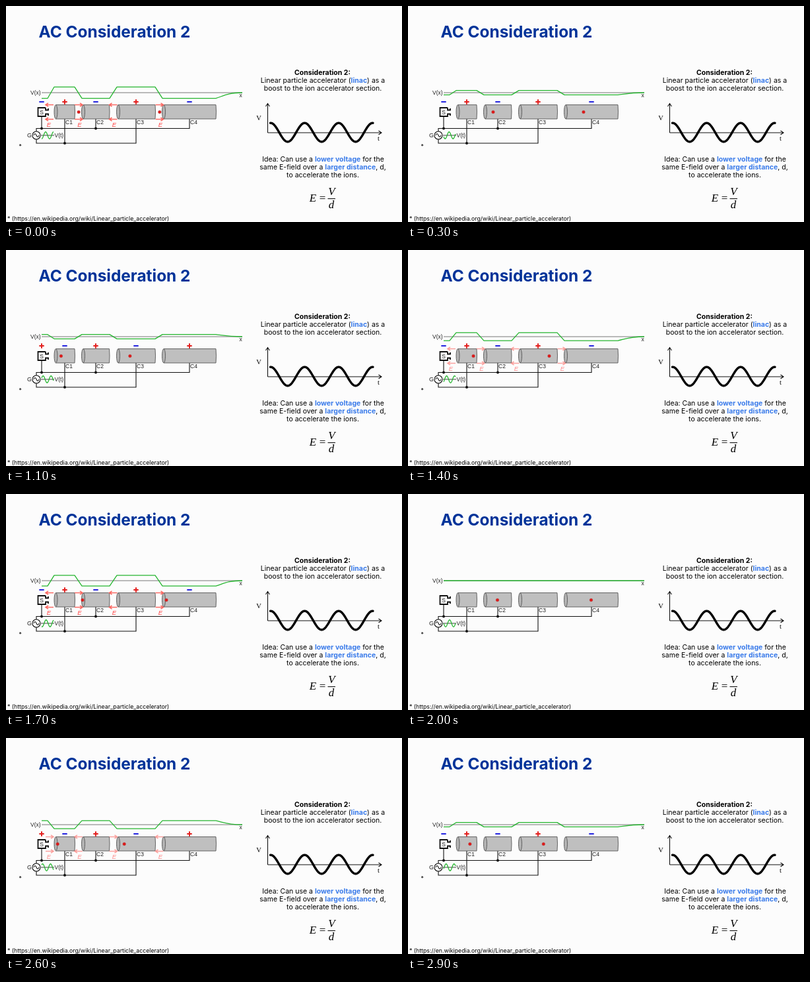
Animation, 600 px wide and 329 px high, one loop 3 s. Source, as an HTML page:

```html
<!DOCTYPE html>
<html lang="en">
<head>
<meta charset="utf-8">
<title>AC Consideration 2</title>
<style>
  html, body { margin: 0; width: 100%; height: 100%; overflow: hidden; background: #fcfcfc; }
  svg { display: block; width: 600px; height: 329px; }
  text { font-family: Inter, sans-serif; }
  .title { font-size: 24.4px; font-weight: 700; fill: #039; }
  .body { font-size: 10.5px; text-anchor: middle; }
  .body .b { font-weight: 700; }
  .key { font-weight: 700; fill: #3a7bea; }
  .note { font-size: 8.75px; }
  .label text { font: 8.5px "Liberation Sans", Arial, sans-serif; fill: #222; }
  .math text { font: 10.5px "Liberation Serif", serif; text-anchor: middle; }
  .math .eq { font-size: 17px; font-style: italic; }
  .line { fill: none; stroke: #111; stroke-width: 1.1; }
  .green { fill: none; stroke: #25b52f; stroke-width: 1.3; stroke-linejoin: round; }
  #field text { font: italic 9.5px "Liberation Sans", Arial, sans-serif; fill: #f44; text-anchor: middle; }
  #field path { fill: none; stroke: #fa6a64; stroke-width: 1.6; }
</style>
</head>
<body>
<svg viewBox="0 0 600 329">
  <text class="title" x="49.5" y="48">AC Consideration 2</text>

  <g class="body">
    <text class="b" x="479.5" y="104.5">Consideration 2:</text>
    <text x="480" y="117">Linear particle accelerator (<tspan class="key">linac</tspan>) as a</text>
    <text x="480" y="129">boost to the ion accelerator section.</text>
    <text x="480.5" y="237">Idea: Can use a <tspan class="key">lower voltage</tspan> for the</text>
    <text x="480" y="249">same E-field over a <tspan class="key">larger distance</tspan>, d,</text>
    <text x="480" y="261">to accelerate the ions.</text>
  </g>
  <text class="note" x="2" y="327">* (https://en.wikipedia.org/wiki/Linear_particle_accelerator)</text>
  <text class="note" x="19.5" y="217">*</text>

  <g class="math">
    <path class="line" d="M396.5 193V149M393.5 153L396.5 148.5L399.5 153M396.5 193H568.5M564.5 190L569 193L564.5 196"/>
    <path id="wave" fill="none" stroke="#000" stroke-width="3.4" stroke-linecap="round"/>
    <text x="383" y="174">V</text>
    <text x="564.5" y="205">t</text>
    <text class="eq" x="465" y="298">E</text>
    <text class="eq" x="479.5" y="298" style="font-style:normal">=</text>
    <text class="eq" x="493.5" y="287.5">V</text>
    <text class="eq" x="493" y="308">d</text>
    <path class="line" d="M487.5 293.5H499"/>
  </g>

  <path d="M54 132H358" stroke="#777"/>
  <path id="volt" class="green"/>

  <g class="line">
    <path d="M54 168V186.5M46 191V186.5H278V172M136 172V186.5M46 203V209H197V172M89 172V209"/>
    <path d="M60 155H48.5V168H60V164.5H64V167M60 155V158.5H64V156" stroke-width="1.8"/>
    <circle cx="46" cy="197" r="6" fill="#fff"/>
    <path d="M42 197Q44 192 46 197T50 197"/>
    <path d="M53 197H73" stroke-width=".8"/>
    <g fill="#111" stroke="none">
      <circle cx="54" cy="186.5" r="2"/>
      <circle cx="136" cy="186.5" r="2"/>
      <circle cx="89" cy="209" r="2"/>
    </g>
  </g>
  <path id="gen" class="green"/>
  <g id="tubes" stroke="#555" stroke-width=".9"></g>

  <g class="label">
    <text x="37" y="135">V(x)</text>
    <text x="353.5" y="138.5">x</text>
    <text x="51.2" y="164.5">S</text>
    <text x="32" y="200" style="font-size:9px">G</text>
    <text x="73.5" y="200">V(t)</text>
    <text x="90" y="180">C1</text>
    <text x="137" y="180">C2</text>
    <text x="198" y="180">C3</text>
    <text x="279" y="180">C4</text>
  </g>

  <g id="signs" fill="none" stroke-width="2"></g>
  <g id="field"></g>
  <g id="ions" fill="#e01818" stroke="#a33" stroke-width=".4"></g>
</svg>
<script>
const STEP = 100, LOOP = 3000, CYCLE = 16;
const MID = 132, PEAK = 8.7;
const tubes = [[73, 105], [114.5, 157.5], [167.5, 227], [236.5, 319]];
const poles = [54, 89, 136, 197, 278];
const gaps = [66, 110, 162.5, 232.5];
// Ion track: [step, x]
const track = [[7, 64], [9, 73], [15, 104.3], [17, 116], [23, 155], [25, 170.5],
               [31, 222.7], [33, 243], [39, 312], [40, 324]];

const $ = id => document.getElementById(id);

function curve(x0, x1, f) {
  let d = "";
  for (let x = x0; x <= x1; x += .5) d += (d ? "L" : "M") + x + " " + f(x).toFixed(2);
  return d;
}

function arrow(x, y, dir) {
  const tip = x + 6 * dir, back = tip - 4 * dir;
  return `M${x - 6 * dir} ${y}H${tip}M${back} ${y - 2.7}L${tip} ${y}L${back} ${y + 2.7}`;
}

function voltage(v) {
  const hi = MID - v, lo = MID + v;
  return `M54 ${lo}H63L73 ${hi}H104L115 ${lo}H157L168 ${hi}H226L237 ${lo}H318` +
         `C330 ${MID + v * .55} 336 ${MID} 358 ${MID}`;
}

function ionX(s) {
  for (let i = 1; i < track.length; i++) {
    const [s0, x0] = track[i - 1], [s1, x1] = track[i];
    if (s >= s0 && s <= s1) return x0 + (x1 - x0) * (s - s0) / (s1 - s0);
  }
  return null;
}

function drawSigns(v) {
  if (Math.abs(v) < .01) return "";
  return poles.map((x, i) => (i % 2 ? v : -v) > 0
    ? `<path stroke="#e3201f" d="M${x - 3.7} 146H${x + 3.7}M${x} 142.3V149.7"/>`
    : `<path stroke="#2222e0" d="M${x - 3.7} 146H${x + 3.7}"/>`).join("");
}

function drawField(v) {
  return gaps.map((x, i) => {
    const dir = (i % 2 ? 1 : -1) * Math.sign(v);
    return `<path d="${arrow(x, 150.5, dir)}${arrow(x, 172.5, dir)}"/>` +
           `<text x="${x + (i ? 1.5 : -1)}" y="184">E</text>`;
  }).join("");
}

function draw(step) {
  const phase = step % CYCLE;
  const v = Math.cos(2 * Math.PI * phase / CYCLE);
  $("volt").setAttribute("d", voltage(PEAK * v));
  $("gen").setAttribute("d", curve(54, 72,
    x => 197 + 5.3 * Math.cos(2 * Math.PI * (phase / CYCLE - (x - 54) / 12))));
  $("signs").innerHTML = drawSigns(v);
  $("field").innerHTML = drawField(v);
  $("field").setAttribute("opacity", Math.max(0, Math.min(1, (Math.abs(v) - .4) / .5)));
  $("ions").innerHTML = [0, 1, 2].map(k => ionX(phase + k * CYCLE))
    .filter(x => x !== null)
    .map(x => `<circle cx="${x}" cy="161.5" r="2.3"/>`).join("");
}

$("wave").setAttribute("d", curve(400.5, 556,
  x => 192.5 - 14.3 * Math.cos(2 * Math.PI * (x - 401) / 51.5)));
$("tubes").innerHTML = tubes.map(([a, b]) =>
  `<path fill="#bfbfbf" d="M${a + 2.5} 150.5H${b - 1}Q${b} 161 ${b - 1} 172H${a + 2.5}"/>` +
  `<ellipse fill="#b4b4b4" cx="${a + 2.5}" cy="161.25" rx="2.5" ry="10.75"/>`).join("");

let last = -1;
function tick() {
  const step = Math.floor(performance.now() % LOOP / STEP);
  if (step !== last) draw(last = step);
  requestAnimationFrame(tick);
}
tick();
</script>
</body>
</html>
```
